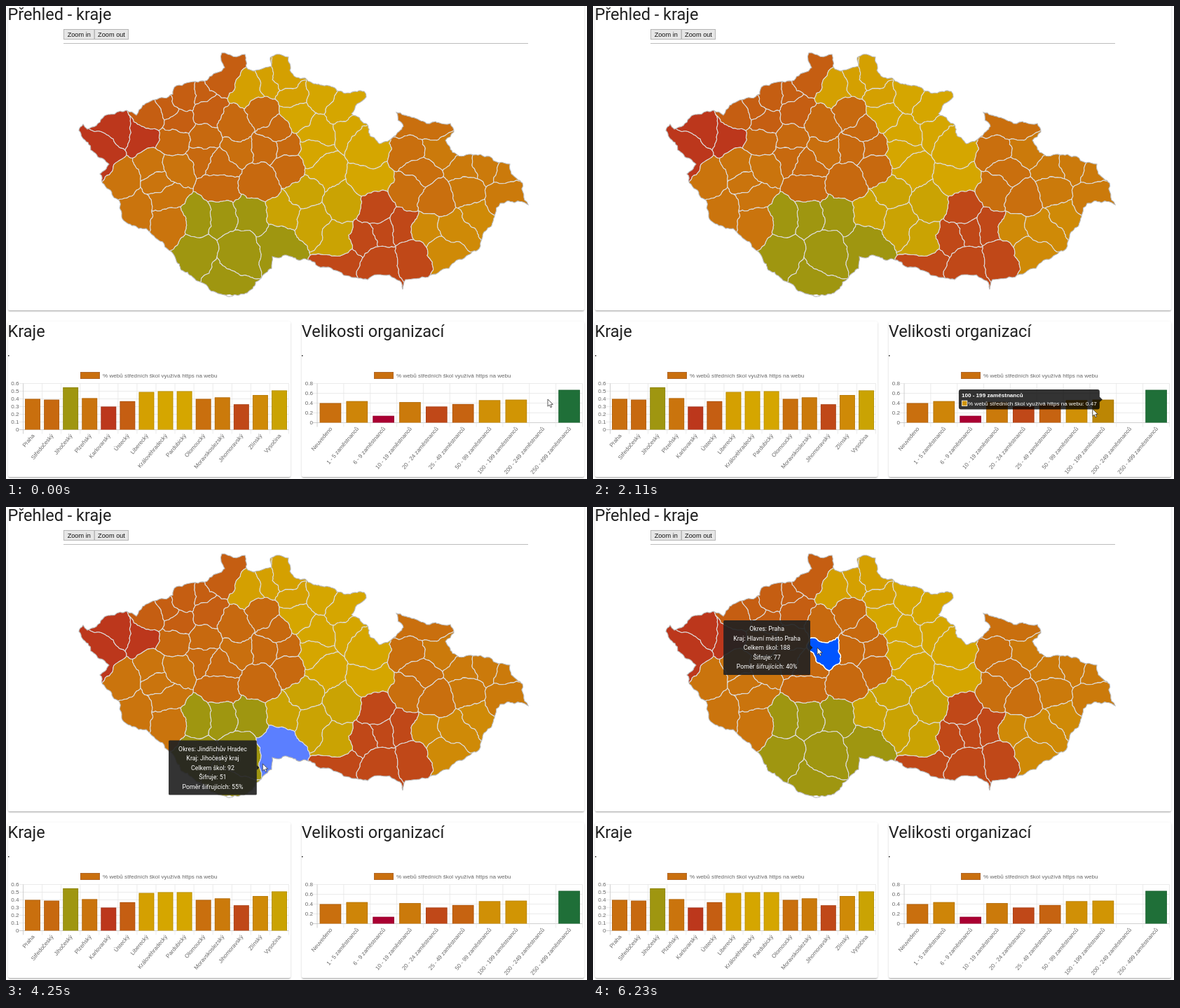
Animation of 829 by 676 pixels, one loop 7270 ms. Source, as an HTML page:

```html
<!DOCTYPE html>
<html lang="cs">
<head>
<meta charset="utf-8">
<title>Přehled - kraje</title>
<style>
html, body { margin: 0; width: 100%; height: 100%; overflow: hidden; background: #fff; }
.card { position: absolute; background: #fff; border-radius: 2px;
  box-shadow: 0 1.4px 1.4px rgba(0,0,0,.14), 0 2px 1px -1.4px rgba(0,0,0,.2), 0 1px 3.4px rgba(0,0,0,.12); }
svg { position: absolute; left: 0; top: 0; }
text { font-family: "Liberation Sans", Arial, sans-serif; font-size: 8.12px; fill: #666; }
.title { font-family: Roboto, sans-serif; font-size: 23.5px; fill: #212121; }
.button { font-size: 9.2px; fill: #111; text-anchor: middle; }
.tip text { fill: #fff; }
.tip .bold { font-weight: bold; }
.map-tip text { font-family: Roboto, sans-serif; font-size: 8.8px; text-anchor: middle; }
</style>
</head>
<body>
<div class="card" style="left:3px;top:-8px;width:822px;height:443px"></div>
<div class="card" style="left:3px;top:451px;width:403px;height:222px"></div>
<div class="card" style="left:422px;top:451px;width:403px;height:222px"></div>
<svg id="stage" width="829" height="676" viewBox="0 0 829 676"></svg>
<script>
const LOOP = 7270, STEP = 10;
const stage = document.getElementById('stage');

function el(tag, attrs = {}, parent = stage, content) {
  const node = document.createElementNS('http://www.w3.org/2000/svg', tag);
  set(node, attrs);
  if (content !== undefined) node.textContent = content;
  parent.appendChild(node);
  return node;
}
function set(node, attrs) {
  for (const key in attrs) node.setAttribute(key, attrs[key]);
}
function track(keys, t) {
  const i = keys.findIndex(k => k[0] > t);
  if (i === 0) return keys[0].slice(1);
  if (i < 0) return keys[keys.length - 1].slice(1);
  const a = keys[i - 1], b = keys[i], f = (t - a[0]) / (b[0] - a[0]);
  return a.slice(1).map((v, n) => v + (b[n + 1] - v) * f);
}

const scale = [[14, 170, 0, 50], [30, 188, 55, 28], [50, 213, 166, 0], [67, 31, 111, 56]];
const colorOf = value => `rgb(${track(scale, value).map(Math.round)})`;

// ---- Data: region, schools, schools with https, district centres
const kraje = [
  ['Praha', 188, 77, 'Praha 330,205'],
  ['Středočeský', 155, 61, 'Rakovník 240,192; Kladno 282,191; Mělník 328,169; Mladá Boleslav 365,153; Nymburk 383,178; Kolín 398,203; Kutná Hora 402,229; Praha-východ 371,203; Praha-západ 308,226; Beroun 281,213; Příbram 306,258; Benešov 362,250'],
  ['Jihočeský', 92, 51, 'Strakonice 272,304; Písek 305,303; Tábor 346,300; Prachatice 271,348; České Budějovice 330,348; Český Krumlov 312,388; Jindřichův Hradec 388,340'],
  ['Plzeňský', 74, 31, 'Tachov 165,248; Plzeň-sever 212,232; Plzeň-město 220,250; Rokycany 241,231; Domažlice 178,285; Plzeň-jih 228,268; Klatovy 234,311'],
  ['Karlovarský', 46, 14, 'Cheb 138,205; Sokolov 152,180; Karlovy Vary 192,184'],
  ['Ústecký', 112, 42, 'Chomutov 208,153; Most 230,143; Teplice 252,130; Ústí nad Labem 275,120; Louny 246,164; Litoměřice 290,150; Děčín 310,101'],
  ['Liberecký', 65, 32, 'Česká Lípa 346,122; Liberec 378,106; Jablonec nad Nisou 402,105; Semily 410,125'],
  ['Královéhradecký', 82, 41, 'Jičín 414,156; Trutnov 447,125; Náchod 482,143; Hradec Králové 440,182; Rychnov nad Kněžnou 495,178'],
  ['Pardubický', 78, 39, 'Pardubice 438,209; Chrudim 452,236; Ústí nad Orlicí 518,200; Svitavy 520,246'],
  ['Olomoucký', 92, 37, 'Jeseník 578,171; Šumperk 575,208; Olomouc 592,238; Prostějov 577,263; Přerov 615,275'],
  ['Moravskoslezský', 148, 63, 'Bruntál 615,205; Opava 655,235; Ostrava 688,232; Nový Jičín 658,262; Karviná 712,237; Frýdek-Místek 710,268'],
  ['Jihomoravský', 136, 45, 'Blansko 527,292; Brno-město 536,322; Brno-venkov 513,331; Vyškov 566,316; Znojmo 481,369; Břeclav 537,366; Hodonín 581,358'],
  ['Zlínský', 72, 33, 'Kroměříž 603,322; Zlín 638,318; Vsetín 672,302; Uherské Hradiště 623,349'],
  ['Vysočina', 64, 33, 'Havlíčkův Brod 425,268; Pelhřimov 399,293; Jihlava 438,305; Žďár nad Sázavou 480,282; Třebíč 475,330']
].map(([name, total, secure, list]) => ({ name, total, secure, value: Math.floor(100 * secure / total), list }));

const districts = kraje.flatMap(kraj => kraj.list.split('; ').map(item => {
  const [, name, x, y] = item.match(/(.+) (\d+),(\d+)/);
  return { name, kraj, at: [+x, +y] };
}));
const outlineKeys = '104,178 110,169 116,176 138,160 172,149 186,156 195,142 212,134 238,126 243,114 274,109 296,97 312,88 308,67 341,69 345,90 362,91 379,86 377,74 386,69 403,73 405,92 414,102 437,110 472,121 511,122 514,130 493,154 514,168 533,197 554,186 567,172 557,152 600,168 634,168 639,180 627,192 637,209 690,215 719,226 721,240 737,253 745,284 705,282 698,297 680,330 675,347 657,357 632,375 570,391 566,405 562,393 530,384 516,391 490,386 460,373 434,363 400,356 380,358 379,375 352,404 316,415 290,405 266,387 242,361 200,318 165,299 147,262 134,240 147,226 117,195'
  .split(' ').map(p => p.split(',').map(Number));

// ---- Map: each district is the area nearest its centre, with roughened edges
const noise = (x, y) => {
  const v = Math.sin(x * 12.9898 + y * 78.233) * 43758.5453;
  return v - Math.floor(v) - .5;
};
function roughEdge(a, b) {
  if (Math.hypot(b[0] - a[0], b[1] - a[1]) < 4.5) return [b];
  const [p, q] = a[0] < b[0] || (a[0] === b[0] && a[1] < b[1]) ? [a, b] : [b, a];
  const mx = (p[0] + q[0]) / 2, my = (p[1] + q[1]) / 2, k = .32 * noise(mx, my);
  const mid = [mx - (q[1] - p[1]) * k, my + (q[0] - p[0]) * k];
  return [...roughEdge(a, mid), ...roughEdge(mid, b)];
}
function roughPath(ring) {
  const out = ring.flatMap((p, i) => roughEdge(p, ring[(i + 1) % ring.length]));
  return 'M' + out.map(p => p.map(v => v.toFixed(1)).join(' ')).join('L') + 'Z';
}
const distance = (a, b) => (a[0] - b[0]) ** 2 + (a[1] - b[1]) ** 2;
function cellOf(district) {
  let ring = [[90, 50], [760, 50], [760, 430], [90, 430]];
  for (const other of districts) {
    if (other === district) continue;
    const side = p => distance(p, other.at) - distance(p, district.at);
    ring = ring.flatMap((a, i) => {
      const b = ring[(i + 1) % ring.length], sa = side(a), sb = side(b);
      const kept = sa >= 0 ? [a] : [];
      if (sa * sb < 0) kept.push(a.map((v, n) => v + (b[n] - v) * sa / (sa - sb)));
      return kept;
    });
  }
  return ring.map(p => p.map(Math.round));
}

const outlinePath = roughPath(outlineKeys);
el('path', { d: outlinePath }, el('clipPath', { id: 'land' }));
const map = el('g', { 'clip-path': 'url(#land)', 'stroke-linejoin': 'round', stroke: '#ddd', 'stroke-width': 1.1 });
for (const district of districts) {
  district.path = roughPath(cellOf(district));
  el('path', { d: district.path, fill: colorOf(district.kraj.value) }, map);
}
const highlight = el('path', {}, map);
const outline = el('path', { d: outlinePath, fill: 'none', stroke: '#bbb', 'stroke-width': 1.1 });

function districtAt(x, y) {
  const point = stage.createSVGPoint();
  point.x = x;
  point.y = y;
  if (!outline.isPointInFill(point)) return null;
  return districts.reduce((best, d) => distance(d.at, [x, y]) < distance(best.at, [x, y]) ? d : best);
}

// ---- Headings and buttons
const heading = (x, y, label) => el('text', { x, y, class: 'title' }, stage, label);
heading(2.5, 20, 'Přehled - kraje');
heading(2.5, 473, 'Kraje');
heading(421.8, 473, 'Velikosti organizací');
for (const x of [3, 422]) el('rect', { x, y: 499, width: 1.5, height: 1.5, fill: '#222' });
for (const [x, width, label] of [[82.5, 43.5, 'Zoom in'], [126.5, 48, 'Zoom out']]) {
  el('rect', { x, y: 33.5, width, height: 14, fill: '#e6e6e6', stroke: '#b5b5b5' });
  el('text', { x: x + width / 2, y: 44, class: 'button' }, stage, label);
}
el('rect', { x: 82, y: 53, width: 663, height: 1, fill: '#bdbdbd' });

// ---- Bar charts
const LEGEND = '% webů středních škol využívá https na webu';
function chart({ left, right, base, max, step, offset, items }) {
  const top = 539.5, pitch = (right - left) / items.length, unit = (base - top) / max;
  const line = (x1, y1, x2, y2, strong) =>
    el('line', { x1, y1, x2, y2, stroke: strong ? '#c4c4c4' : '#e6e6e6', 'stroke-width': .8 });
  for (let v = 0; v <= max + .01; v += step) {
    const y = base - v * unit;
    line(left - 6, y, right, y, v === 0);
    el('text', { x: left - 6, y: y + 2.8, 'text-anchor': 'end' }, stage, v ? v.toFixed(1) : '0');
  }
  for (let i = 0; i <= items.length; i++) line(left + i * pitch, top, left + i * pitch, base + 6, i === 0);
  el('rect', { x: offset + 106.5, y: 523.5, width: 27, height: 9, fill: colorOf(40), stroke: '#b0672a' });
  el('text', { x: offset + 138, y: 531 }, stage, LEGEND);
  return items.map(({ name, value }, i) => {
    const x = left + (i + .5) * pitch, half = pitch * .405, y = base - value / 100 * unit;
    el('text', { transform: `translate(${x + 3} ${base + 9}) rotate(-50)`, 'text-anchor': 'end' }, stage, name);
    const rect = el('rect', { x: x - half, y, width: 2 * half, height: base - y, fill: colorOf(value) });
    if (value) el('path', {
      d: `M${x - half + .4} ${base}V${y + .4}H${x + half - .4}V${base}`,
      fill: 'none', stroke: '#000', 'stroke-opacity': .14, 'stroke-width': .8
    });
    const contains = (px, py) => Math.abs(px - x) <= half && py >= y && py <= base;
    return { x, y, name, value, rect, contains };
  });
}
chart({ left: 24.5, right: 403.5, base: 605.5, max: .6, step: .1, offset: 0, items: kraje });
const sizes = { '1 - 5': 44, '6 - 9': 14, '10 - 19': 42, '20 - 24': 33, '25 - 49': 38, '50 - 99': 46,
  '100 - 199': 47, '200 - 249': 0, '250 - 499': 67 };
const bars = chart({
  left: 444, right: 822.5, base: 595.5, max: .8, step: .2, offset: 419,
  items: [{ name: 'Neuvedeno', value: 40 },
    ...Object.entries(sizes).map(([size, value]) => ({ name: size + ' zaměstnanců', value }))]
});

// ---- Tooltips and pointer
const barTip = el('g', { class: 'tip' });
el('path', { d: 'M3 0H198a3 3 0 0 1 3 3V10.5L205 14.3L201 18V25.5a3 3 0 0 1 -3 3H3a3 3 0 0 1 -3 -3V3a3 3 0 0 1 3 -3Z', fill: '#000', 'fill-opacity': .8 }, barTip);
const barTipTitle = el('text', { x: 4, y: 10.5, class: 'bold' }, barTip);
const barTipSwatch = el('rect', { x: 4.5, y: 16, width: 7.5, height: 7.5, stroke: '#fff', 'stroke-width': .8 }, barTip);
const barTipText = el('text', { x: 13, y: 22.8 }, barTip);

const mapTip = el('g', { class: 'tip map-tip' });
const mapTipBox = el('rect', { y: -39, height: 78, rx: 1.5, fill: '#222', 'fill-opacity': .92 }, mapTip);
el('path', { d: 'M0 -3.5L3.5 0L0 3.5Z', fill: '#222' }, mapTip);
const mapTipLines = [0, 1, 2, 3, 4].map(i => el('text', { y: -24 + i * 13.5 }, mapTip));

const arrow = el('path', { d: 'M0 0V10.2L2.4 8L4.1 11.8L5.8 11L4.2 7.4H7.4Z', fill: '#fff', stroke: '#333', 'stroke-width': .8 });
const beam = el('path', { d: 'M-2.5 -5.5H-.7L0 -5L.7 -5.5H2.5M0 -5V5M-2.5 5.5H-.7L0 5L.7 5.5H2.5', fill: 'none', stroke: '#222', 'stroke-width': 1 });

// ---- Timeline: the pointer path drives every hover
const pointer = [[50, 773, 562], [130, 790, 572], [310, 797, 574], [480, 797, 574], [680, 791, 574], [920, 791, 574],
  [1080, 787, 571], [1590, 768, 574], [2110, 713, 576], [2570, 658, 577], [3120, 573, 541], [3590, 482, 455],
  [3890, 381, 422], [4650, 350, 306], [4800, 324, 246], [5300, 324, 180], [5520, 324, 180], [5770, 320, 201]];
const PRESS = 6230, TIP_LAG = 37, FADE_IN = 240, FADE_OUT = 165, SLIDE = 200;

function recordHovers() {
  const states = [];
  let alpha = 0, x = 0, y = 0, label = bars[0];
  for (let t = 0; t < LOOP; t += STEP) {
    const at = track(pointer, t), bar = bars.find(b => b.contains(...at));
    if (bar) {
      label = bar;
      if (alpha === 0) ({ x, y } = bar);
    }
    alpha = bar ? Math.min(1, alpha + STEP / FADE_IN) : Math.max(0, alpha - STEP / FADE_OUT);
    const ease = 1 - Math.exp(-STEP / SLIDE);
    x += (label.x - x) * ease;
    y += (label.y - y) * ease;
    states.push({ bar, label, alpha, x, y, district: districtAt(...at) });
  }
  return states;
}
const hovers = recordHovers();

function drawBarTip({ bar: hovered, label, alpha, x, y }) {
  for (const bar of bars) bar.rect.style.filter = bar === hovered ? 'brightness(.9)' : '';
  set(barTip, { transform: `translate(${x - 206} ${y - 14.5})`, opacity: alpha });
  barTipTitle.textContent = label.name;
  barTipText.textContent = `${LEGEND}: 0.${label.value}`;
  set(barTipSwatch, { fill: colorOf(label.value) });
}

function drawMapTip(district, t) {
  highlight.style.display = mapTip.style.display = district ? '' : 'none';
  if (!district) return;
  const pressed = t >= PRESS, { name, total, secure, value } = district.kraj;
  set(highlight, {
    d: district.path, fill: pressed ? '#0055ff' : '#5b7fff',
    stroke: pressed ? '#fff' : '#ddd', 'stroke-width': pressed ? 1.5 : 1.1
  });
  const region = name === 'Praha' ? 'Hlavní město Praha' : name + ' kraj';
  [`Okres: ${district.name}`, `Kraj: ${region}`, `Celkem škol: ${total}`, `Šifruje: ${secure}`, `Poměr šifrujících: ${value}%`]
    .forEach((line, i) => mapTipLines[i].textContent = line);
  const width = 28 + Math.max(...mapTipLines.map(line => line.getComputedTextLength()));
  for (const line of mapTipLines) set(line, { x: -width / 2 });
  set(mapTipBox, { x: -width, width });
  const [x, y] = track(pointer, t - TIP_LAG);
  set(mapTip, { transform: `translate(${x - 10} ${y})` });
}

function draw(now) {
  const t = now % LOOP, state = hovers[Math.floor(t / STEP)];
  drawBarTip(state);
  drawMapTip(state.district, t);
  const [x, y] = track(pointer, t);
  const overText = x > 421 && x < 624 && y > 450 && y < 480;
  arrow.style.display = overText ? 'none' : '';
  beam.style.display = overText ? '' : 'none';
  set(overText ? beam : arrow, { transform: `translate(${x} ${y})` });
}

const start = performance.now();
function tick() {
  draw(performance.now() - start);
  requestAnimationFrame(tick);
}
tick();
</script>
</body>
</html>
```
